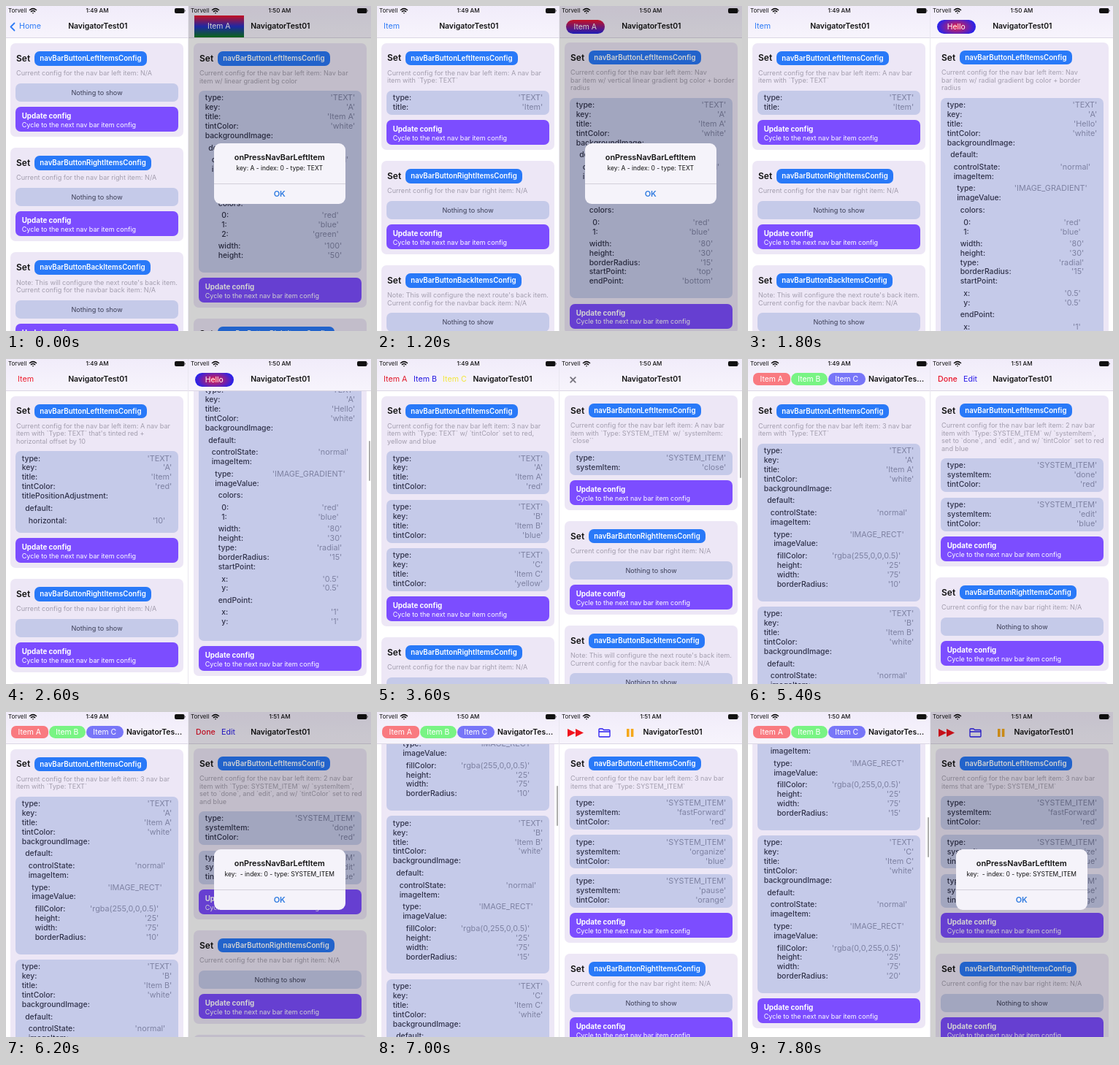
An HTML page for the animation above (8000 ms loop, 500x445 px).

```html
<!DOCTYPE html>
<html lang="en">
<head>
<meta charset="utf-8">
<title>Nav bar config demo</title>
<style>
html, body { margin: 0; width: 100%; height: 100%; overflow: hidden; background: #fff; }
body { font-family: Inter, Roboto, sans-serif; }
#stage { position: relative; width: 500px; height: 445px; overflow: hidden; background: #e9e7f0; }
.phone { position: absolute; top: 0; width: 249px; height: 445px; overflow: hidden; background: #fff; white-space: nowrap; }
.phone + .phone { left: 250px; width: 250px; }
.page { position: absolute; left: 6px; width: 237px; }
.phone + .phone .page { left: 7px; }
.card { padding: 0 7px 7px; margin-bottom: 15px; border-radius: 7px; background: #ede7f6; }
.head { display: flex; align-items: center; height: 20px; padding: 10.6px 0 5.5px 1px; font: 600 12px/20px Inter, sans-serif; color: #111; }
.head b { position: absolute; left: 33px; padding: 0 7.3px; border-radius: 7px; background: #2979f8; color: #fff; font: 600 9.7px/19.5px Inter, sans-serif; }
.desc { padding-left: 1px; margin-bottom: 7.8px; font-size: 9.1px; line-height: 10.6px; color: #a39eae; }
.box { padding: 4.2px 8.7px 3px; margin-bottom: 7.4px; border-radius: 7px; background: #c5cae9; }
.row { display: flex; justify-content: space-between; height: 12.95px; font: 500 10.4px/12.95px Inter, sans-serif; color: #30324a; }
.row i { font-style: normal; font-weight: 400; font-size: 10.8px; color: #7e82a2; }
.nest { padding: 3.7px 4.5px 3.2px; }
.none { padding: 0; font-size: 9.1px; line-height: 25.2px; text-align: center; color: #3b3d55; }
.update { height: 27px; padding: 7px 8.7px 0; border-radius: 7px; background: #7c4dff; color: #fff; font-size: 9px; line-height: 11.8px; }
.update b { display: block; font-size: 9.8px; }
.bar { position: absolute; inset: 0 0 auto; height: 43px; background: linear-gradient(#f1ecfa, #f7f4fc); border-bottom: .5px solid #dcd7e4; }
.bar span, .bar svg { position: absolute; }
.status { top: 1px; font-size: 8px; line-height: 11px; color: #111; }
.clock { left: 0; width: 250px; text-align: center; font-weight: 500; }
.title { top: 20px; width: 100px; margin-left: -50px; text-align: center; font: 600 10.4px/16px Inter, sans-serif; color: #111; }
.item { top: 20px; font-size: 10.7px; line-height: 16px; }
.chip { color: #fff; font-size: 10.4px; text-align: center; }
.thumb { position: absolute; right: 1px; width: 2px; border-radius: 1px; background: rgba(0, 0, 0, .32); }
.dim { position: absolute; inset: 0; background: rgba(0, 0, 0, .18); }
.alert { position: absolute; left: 34.5px; top: 188px; width: 180.5px; height: 83px; border-radius: 9px; background: #f5f3fa; text-align: center; white-space: pre; color: #111; }
.alert * { position: absolute; left: 0; width: 100%; }
.alert b { top: 12px; font: 600 10.8px/16px Inter, sans-serif; }
.alert p { top: 28px; margin: 0; font-size: 8.5px; line-height: 12px; }
.alert em { top: 55px; height: 28px; border-top: .7px solid #d3d0da; font: 600 11px/27px Inter, sans-serif; color: #2f7be0; }
</style>
</head>
<body>
<div id="stage"></div>
<script>
const LOOP = 8000, STEP = 200;
const clamp = v => Math.max(0, Math.min(1, v));
const ease = v => v * v * (3 - 2 * v);

// Page markup
const rows = tree => Object.entries(tree).map(([key, value]) => typeof value === 'string'
  ? `<div class="row"><span>${key}:</span><i>'${value}'</i></div>`
  : `<div class="row"><span>${key}:</span></div><div class="nest">${rows(value)}</div>`).join('');

const card = (side, desc, boxes = []) => `<div class="card">
  <div class="head">Set<b>navBarButton${side}ItemsConfig</b></div>
  <div class="desc">${desc}</div>
  ${boxes.map(b => `<div class="box">${rows(b)}</div>`).join('') || '<div class="box none">Nothing to show</div>'}
  <div class="update"><b>Update config</b>Cycle to the next nav bar item config</div></div>`;

const current = 'Current config for the nav bar left item: ';
const page = (desc, boxes) => card('Left', current + desc, boxes)
  + card('Right', 'Current config for the nav bar right item: N/A')
  + card('Back', "Note: This will configure the next route's back item.<br>Current config for the navbar back item: N/A");

// Navigation bar pieces
const label = (x, text, color, weight = 400) =>
  `<span class="item" style="left:${x}px;color:${color};font-weight:${weight}">${text}</span>`;
const chip = (x, y, w, h, radius, fill, text) =>
  `<span class="chip" style="left:${x}px;top:${y}px;width:${w}px;height:${h}px;line-height:${h}px;border-radius:${radius}px;background:${fill}">${text}</span>`;
const icon = (x, y, w, h, attrs, path) =>
  `<svg style="left:${x}px;top:${y}px" width="${w}" height="${h}" ${attrs}><path d="${path}"/></svg>`;
const stroke = (color, width) => `fill="none" stroke="${color}" stroke-width="${width}" stroke-linecap="round" stroke-linejoin="round"`;

const wifi = icon(31, 2, 12, 9, stroke('#111', 1.5), 'M1.5 3.5Q6 -.3 10.5 3.5M3.4 5.6Q6 3.4 8.6 5.6M6 7.6V7.7');
const battery = icon(230.5, 3, 16, 8, 'fill="#111"', 'M2 0H11.5Q13.5 0 13.5 2V5Q13.5 7 11.5 7H2Q0 7 0 5V2Q0 0 2 0ZM14.2 2.3Q15.6 3.5 14.2 4.7Z');

// Config trees
const text = (key, title, tintColor, more) => ({ type: 'TEXT', key, title, tintColor, ...more });
const system = (systemItem, tintColor) => ({ type: 'SYSTEM_ITEM', systemItem, ...(tintColor && { tintColor }) });
const image = (type, imageValue) => ({
  backgroundImage: { default: { controlState: 'normal', imageItem: { type, imageValue } } }
});
const gradient = (title, value) => [text('A', title, 'white', image('IMAGE_GRADIENT', value))];
const rect = (key, rgb, borderRadius) => text(key, 'Item ' + key, 'white',
  image('IMAGE_RECT', { fillColor: `rgba(${rgb},0.5)`, height: '25', width: '75', borderRadius }));

const textPress = 'key: A - index: 0 - type: TEXT';
const systemPress = 'key:  - index: 0 - type: SYSTEM_ITEM';
const closeIcon = icon(14, 24, 9, 9, stroke('#77747e', 1.8), 'M1.2 1.2L7.8 7.8M7.8 1.2L1.2 7.8');
const mediaIcons = icon(11, 23, 23, 11, 'fill="#f0141e"', 'M0 0L11 5.5L0 11ZM11 0L22 5.5L11 11Z')
  + icon(53, 22, 18, 13, stroke('#2a1cf0', 1.3), 'M1 11V2Q1 1 2 1H6L7.5 2.5H15Q16 2.5 16 3.5V11Q16 12 15 12H2Q1 12 1 11ZM1 5H16')
  + icon(92, 23, 10, 11, 'fill="#f5a81c"', 'M0 0H3.6V11H0ZM5.8 0H9.4V11H5.8Z');

const phones = [
  {
    top: 50.7,
    clock: t => t < 6800 ? '1:49 AM' : '1:50 AM',
    alerts: [[4000, 5000]],
    scroll: t => 393 * ease(clamp((t - 6400) / 1200)),
    thumb: t => t > 6400 && 58 + 86 * ease(clamp((t - 6400) / 1200)),
    states: [
      { from: 0, shift: .6, body: page('N/A'),
        nav: icon(5, 22, 8, 13, stroke('#2f7cf6', 1.8), 'M6.5 1.5L1.5 6.5L6.5 11.5') + label(18, 'Home', '#2f7cf6') },
      { from: 600, nav: label(9, 'Item', '#2f7cf6'),
        body: page('A nav bar<br>item with `Type: TEXT`', [{ type: 'TEXT', title: 'Item' }]) },
      { from: 2000, nav: label(16, 'Item', '#ee1c2e'),
        body: page("A nav bar<br>item with `Type: TEXT` that's tinted red +<br>horizontal offset by 10",
          [text('A', 'Item', 'red', { titlePositionAdjustment: { default: { horizontal: '10' } } })]) },
      { from: 3000, title: 172, press: textPress,
        nav: label(9, 'Item A', '#e0182a') + label(50, 'Item B', '#2418e0') + label(90, 'Item C', '#f2e63c'),
        body: page('3 nav bar<br>item with `Type: TEXT` w/ `tintColor` set to red,<br>yellow and blue',
          [text('A', 'Item A', 'red'), text('B', 'Item B', 'blue'), text('C', 'Item C', 'yellow')]) },
      { from: 5400, title: 203, name: 'NavigatorTes…',
        nav: chip(7, 19, 50.5, 17, 6.7, '#f97a80', 'Item A') + chip(58.5, 19, 50.5, 17, 8.5, '#79f484', 'Item B')
          + chip(110, 19, 50.5, 17, 8.5, '#7876f8', 'Item C'),
        body: page('3 nav bar<br>item with `Type: TEXT`',
          [rect('A', '255,0,0', '10'), rect('B', '0,255,0', '15'), rect('C', '0,0,255', '20')]) }
    ]
  },
  {
    top: 50,
    clock: t => t < 4000 ? '1:50 AM' : '1:51 AM',
    alerts: [[-400, 400], [800, 1600], [3800, 5000], [5600, 6600], [7200, 8400]],
    scroll: t => t < 3000 ? 92.5 * ease(clamp((t - 1800) / 700)) : 0,
    thumb: t => t > 1800 && t < 3800 && (t < 3000 ? 58 + 54 * ease(clamp((t - 1800) / 700)) : 108),
    states: [
      { from: 0, shift: 1.2, press: textPress,
        nav: chip(8, 13, 67.5, 30, 0, 'linear-gradient(#f01428, #2430c8 50%, #0c7a1c)', 'Item A'),
        body: page('Nav bar<br>item w/ linear gradient bg color', gradient('Item A',
          { colors: { 0: 'red', 1: 'blue', 2: 'green' }, width: '100', height: '50' })) },
      { from: 600, press: textPress,
        nav: chip(8.5, 18.5, 53.5, 19.5, 9.8, 'linear-gradient(#f0142c, #2424e0)', 'Item A'),
        body: page('Nav<br>bar item w/ vertical linear gradient bg color + border<br>radius', gradient('Item A',
          { colors: { 0: 'red', 1: 'blue' }, width: '80', height: '30', borderRadius: '15', startPoint: 'top', endPoint: 'bottom' })) },
      { from: 1800,
        nav: chip(8.5, 18.5, 53.5, 19.5, 9.8, 'radial-gradient(ellipse 27px 14px, #f0203c, #2222f0)', 'Hello'),
        body: page('Nav<br>bar item w/ radial gradient bg color + border<br>radius', gradient('Hello',
          { colors: { 0: 'red', 1: 'blue' }, width: '80', height: '30', type: 'radial', borderRadius: '15',
            startPoint: { x: '0.5', y: '0.5' }, endPoint: { x: '1', y: '1' } })) },
      { from: 3000, press: systemPress, nav: closeIcon,
        body: page('A nav bar<br>item with `Type: SYSTEM_ITEM` w/ `systemItem:<br>`close``', [system('close')]) },
      { from: 5200, press: systemPress, nav: label(10, 'Done', '#e8142a', 500) + label(45, 'Edit', '#2a1ce8'),
        body: page('2 nav bar<br>item with `Type: SYSTEM_ITEM` w/ `systemItem`,<br>set to `done`, and `edit`, and w/ `tintColor` set to red<br>and blue',
          [system('done', 'red'), system('edit', 'blue')]) },
      { from: 6800, press: systemPress, title: 155, nav: mediaIcons,
        body: page('3 nav bar<br>items that are `Type: SYSTEM_ITEM`',
          [system('fastForward', 'red'), system('organize', 'blue'), system('pause', 'orange')]) }
    ]
  }
];

const stage = document.getElementById('stage');
for (const phone of phones) {
  const root = document.createElement('div');
  root.className = 'phone';
  root.innerHTML = `<div class="page"></div><div class="thumb"></div>
    <div class="bar"><span class="status" style="left:3px">Torvell</span>${wifi}
    <span class="status clock"></span>${battery}<div class="nav"></div><span class="title"></span></div>
    <div class="overlay"><div class="dim"></div>
    <div class="alert"><b>onPressNavBarLeftItem</b><p></p><em>OK</em></div></div>`;
  phone.find = selector => root.querySelector(selector);
  stage.append(root);
}

function show(phone, state) {
  phone.shown = state;
  phone.find('.page').innerHTML = state.body;
  phone.find('.nav').innerHTML = state.nav;
  phone.find('.title').textContent = state.name || 'NavigatorTest01';
  phone.find('.title').style.left = (state.title || 125.8) + 'px';
  phone.find('.alert p').textContent = state.press || '';
}

function draw(phone, t) {
  const state = phone.states.findLast(s => s.from <= t);
  if (state !== phone.shown) show(phone, state);
  phone.find('.page').style.top = phone.top + (state.shift || 0) - phone.scroll(t) + 'px';
  phone.find('.clock').textContent = phone.clock(t);
  const y = phone.thumb(t), thumb = phone.find('.thumb').style;
  thumb.display = y === false ? 'none' : 'block';
  thumb.top = y + 'px';
  thumb.height = '55px';
  const fades = phone.alerts.map(([start, end]) => Math.min(clamp((t - start) / 300), clamp((end - t) / 300)));
  phone.find('.overlay').style.opacity = Math.max(...fades);
}

const begin = performance.now();
function tick(now) {
  const t = Math.floor(Math.max(0, now - begin) % LOOP / STEP) * STEP;
  phones.forEach(phone => draw(phone, t));
  requestAnimationFrame(tick);
}
tick(begin);
</script>
</body>
</html>
```
